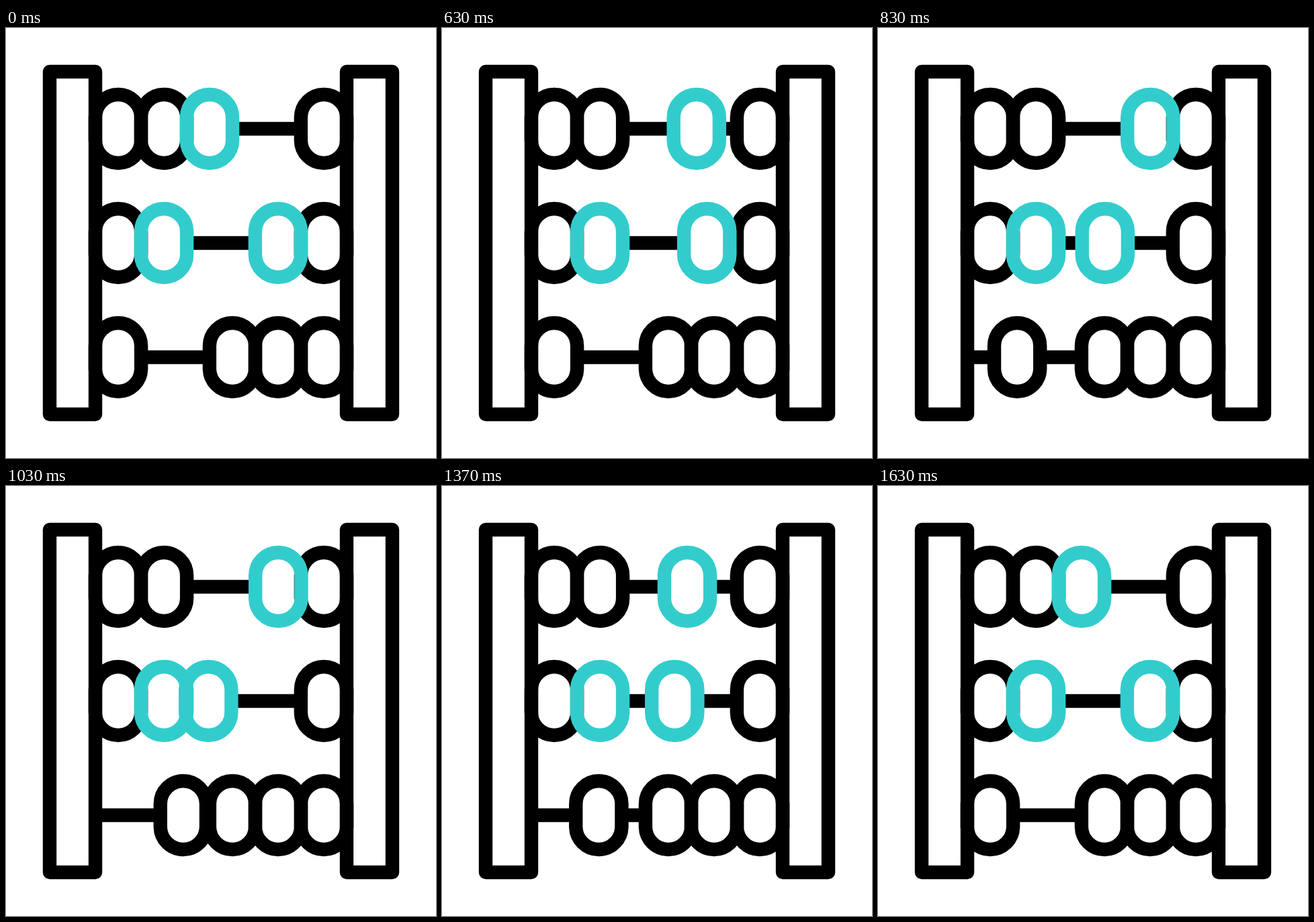
An HTML page for the animation above (1.67 s loop, 640 px wide and 640 px high).

```html
<!DOCTYPE html>
<html lang="en">
<head>
<meta charset="utf-8">
<title>Abacus</title>
<style>
  html, body { margin: 0; width: 100%; height: 100%; overflow: hidden; background: #fff; }
  svg { display: block; width: 100%; height: 100%; }
</style>
</head>
<body>
<svg id="stage" viewBox="0 0 640 640" fill="none" stroke-width="20.4" stroke-linejoin="round"></svg>
<script>
const LOOP = 1670, FPS = 30;
const BLACK = '#000', TEAL = '#33cccc';
const ROWS = [150, 320, 490];
const stage = document.getElementById('stage');

function add(parent, tag, attrs) {
  const el = document.createElementNS('http://www.w3.org/2000/svg', tag);
  for (const key in attrs) el.setAttribute(key, attrs[key]);
  return parent.appendChild(el);
}

// Rods lie below the bead fills; all outlines lie above them.
const rods = add(stage, 'g', { stroke: BLACK });
const fills = add(stage, 'g', { fill: '#fff' });
const dark = add(stage, 'g', { stroke: BLACK });
const bright = add(stage, 'g', { stroke: TEAL });

for (const y of ROWS) add(rods, 'path', { d: `M133 ${y}H507` });
for (const x of [65, 507]) add(dark, 'rect', { x, y: 65, width: 68, height: 510 });

function bead(x, row, layer) {
  const shape = { x: -34.1, y: -51, width: 68.2, height: 102, rx: 34.1 };
  const parts = [add(fills, 'rect', shape), add(layer, 'rect', shape)];
  const move = cx => parts.forEach(p => p.setAttribute('transform', `translate(${cx} ${ROWS[row]})`));
  move(x);
  return move;
}

[167, 235, 473].forEach(x => bead(x, 0, dark));
[167, 473].forEach(x => bead(x, 1, dark));
[337, 405, 473].forEach(x => bead(x, 2, dark));
bead(235, 1, bright);

// go and back are [start, end] in animation steps
const sliders = [
  { move: bead(303, 0, bright), from: 303, to: 405.3, go: [13, 22], back: [35, 49] },
  { move: bead(405, 1, bright), from: 405, to: 301.3, go: [16, 31], back: [34.3, 49] },
  { move: bead(167, 2, dark), from: 167, to: 266, go: [19.5, 32.1], back: [36, 49] }
];

function ease(step, [start, end]) {
  const p = Math.min(1, Math.max(0, (step - start) / (end - start)));
  return p * p * (3 - 2 * p);
}

function draw(ms) {
  const time = Math.floor((ms % LOOP) / 10) * 10;
  const step = Math.floor((time + 5) * FPS / 1000);
  for (const s of sliders) {
    s.move(s.from + (s.to - s.from) * (ease(step, s.go) - ease(step, s.back)));
  }
}

function tick(now) {
  draw(now);
  requestAnimationFrame(tick);
}
draw(0);
requestAnimationFrame(tick);
</script>
</body>
</html>
```
